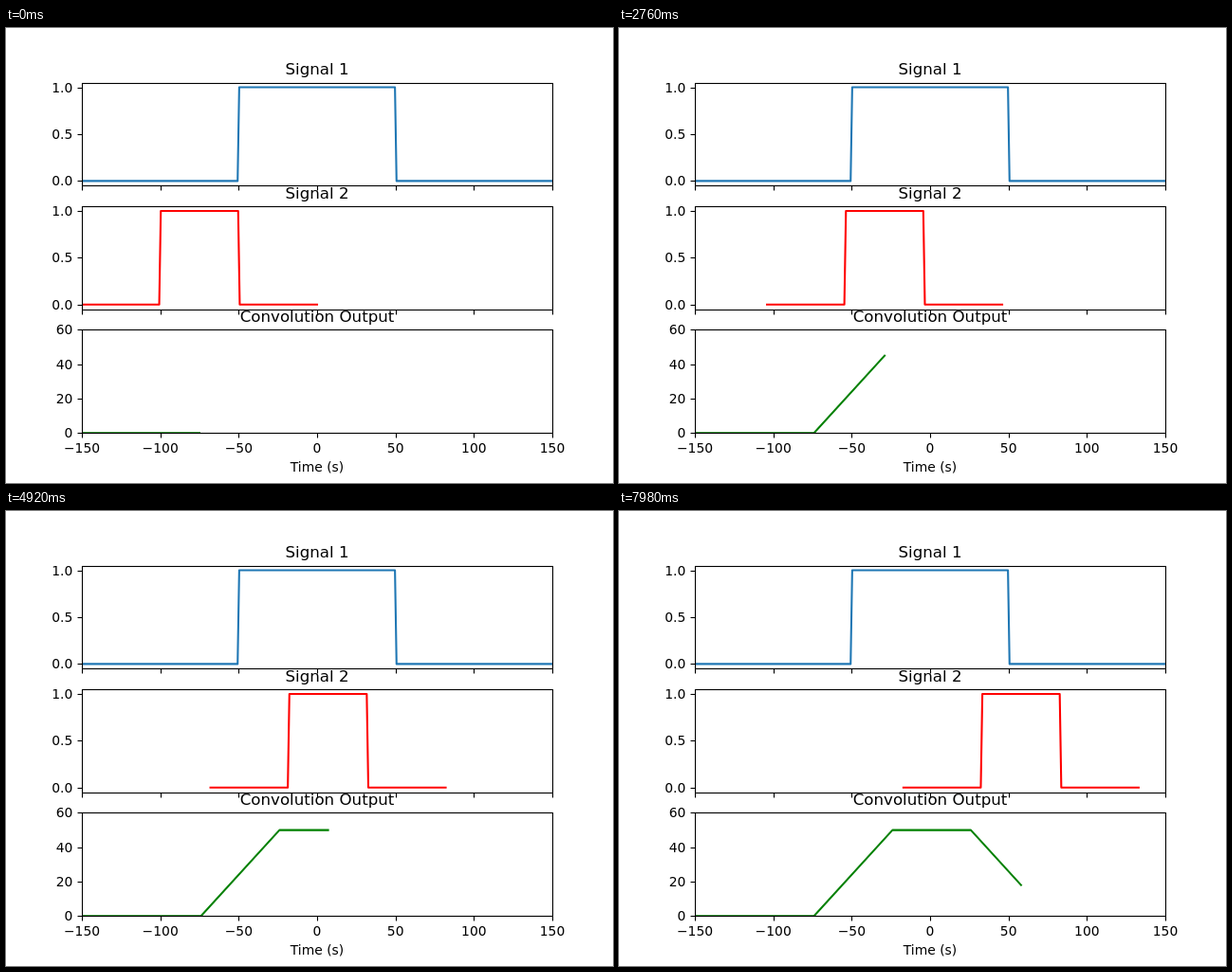
Recreate the animation shown at these times as an HTML page with a canvas. Size 640 by 480 pixels, loop 8 s.

```html
<!DOCTYPE html>
<html lang="en">
<head>
<meta charset="utf-8">
<title>Convolution of two pulses</title>
<style>
  html, body { margin: 0; width: 100%; height: 100%; overflow: hidden; background: #fff; }
  canvas { display: block; }
</style>
</head>
<body>
<canvas id="stage" width="640" height="480"></canvas>
<script>
const ctx = document.getElementById('stage').getContext('2d');

const LOOP = 8000, STEP = 60;
const LEFT = 80, RIGHT = 576, PANEL_HEIGHT = 108.706;
const POINT = 100 / 72;
const X_TICKS = [-150, -100, -50, 0, 50, 100, 150];

const unitTicks = [[0, '0.0'], [0.5, '0.5'], [1, '1.0']];
const panels = [
  { title: 'Signal 1', top: 57.6, min: -0.05, max: 1.05, ticks: unitTicks, color: '#1f77b4' },
  { title: 'Signal 2', top: 188.047, min: -0.05, max: 1.05, ticks: unitTicks, color: '#ff0000' },
  { title: 'Convolution Output', top: 318.494, min: 0, max: 60,
    ticks: [0, 20, 40, 60].map(v => [v, String(v)]), color: '#008000' },
];

const xPos = x => LEFT + (x + 150) / 300 * (RIGHT - LEFT);
const yPos = (panel, y) => panel.top + PANEL_HEIGHT * (panel.max - y) / (panel.max - panel.min);
const snap = v => Math.floor(v + 0.5) + 0.5;

// Pulse sampled at `count` points from start to end, high for indices in [rise, fall).
function pulse(start, end, count, rise, fall) {
  const at = i => start + (end - start) * i / (count - 1);
  return [[start, 0], [at(rise - 1), 0], [at(rise), 1], [at(fall - 1), 1], [at(fall), 0], [end, 0]];
}

const convolution = x => Math.max(0, Math.min(50, x + 74, 76 - x));

function convolutionUntil(end) {
  const xs = [-150, -74, -24, 26].filter(x => x < end).concat(end);
  return xs.map(x => [x, convolution(x)]);
}

function drawText(text, x, y, size, align = 'center') {
  ctx.font = `${size * POINT}px "DejaVu Sans", sans-serif`;
  ctx.textAlign = align;
  ctx.fillText(text, x, y);
}

function drawSegment(x1, y1, x2, y2) {
  ctx.beginPath();
  ctx.moveTo(x1, y1);
  ctx.lineTo(x2, y2);
  ctx.stroke();
}

function drawCurve(panel, points) {
  const top = Math.round(panel.top), bottom = Math.round(panel.top + PANEL_HEIGHT);
  ctx.save();
  ctx.beginPath();
  ctx.rect(LEFT, top, RIGHT - LEFT, bottom - top);
  ctx.clip();
  ctx.strokeStyle = panel.color;
  ctx.lineWidth = 1.5 * POINT;
  ctx.lineCap = 'square';
  ctx.lineJoin = 'round';
  ctx.beginPath();
  for (const [x, y] of points) ctx.lineTo(xPos(x), yPos(panel, y));
  ctx.stroke();
  ctx.restore();
}

function drawAxes(panel) {
  const left = snap(LEFT), right = snap(RIGHT);
  const top = snap(panel.top), bottom = snap(panel.top + PANEL_HEIGHT);
  ctx.strokeStyle = ctx.fillStyle = '#000';
  ctx.lineWidth = 0.8 * POINT;
  ctx.strokeRect(left, top, right - left, bottom - top);
  for (const x of X_TICKS) drawSegment(snap(xPos(x)), bottom, snap(xPos(x)), bottom + 5);
  for (const [value, label] of panel.ticks) {
    const y = snap(yPos(panel, value));
    drawSegment(left, y, left - 5, y);
    drawText(label, 70.3, Math.floor(y) + 5, 10, 'right');
  }
  drawText(panel.title, (LEFT + RIGHT) / 2, Math.round(panel.top - 6 * POINT), 12);
}

function render(time) {
  const shift = Math.floor(time % LOOP / STEP);
  const curves = [
    pulse(-150, 150, 300, 100, 200),
    pulse(shift - 150, shift, 150, 50, 100),
    convolutionUntil(shift - 75),
  ];
  ctx.fillStyle = '#fff';
  ctx.fillRect(0, 0, 640, 480);
  panels.forEach((panel, i) => {
    drawCurve(panel, curves[i]);
    drawAxes(panel);
  });
  for (const x of X_TICKS) drawText(String(x).replace('-', '\u2212'), xPos(x), 448, 10);
  drawText('Time (s)', (LEFT + RIGHT) / 2, 468, 10);
}

function tick() {
  render(performance.now());
  requestAnimationFrame(tick);
}
tick();
</script>
</body>
</html>
```
